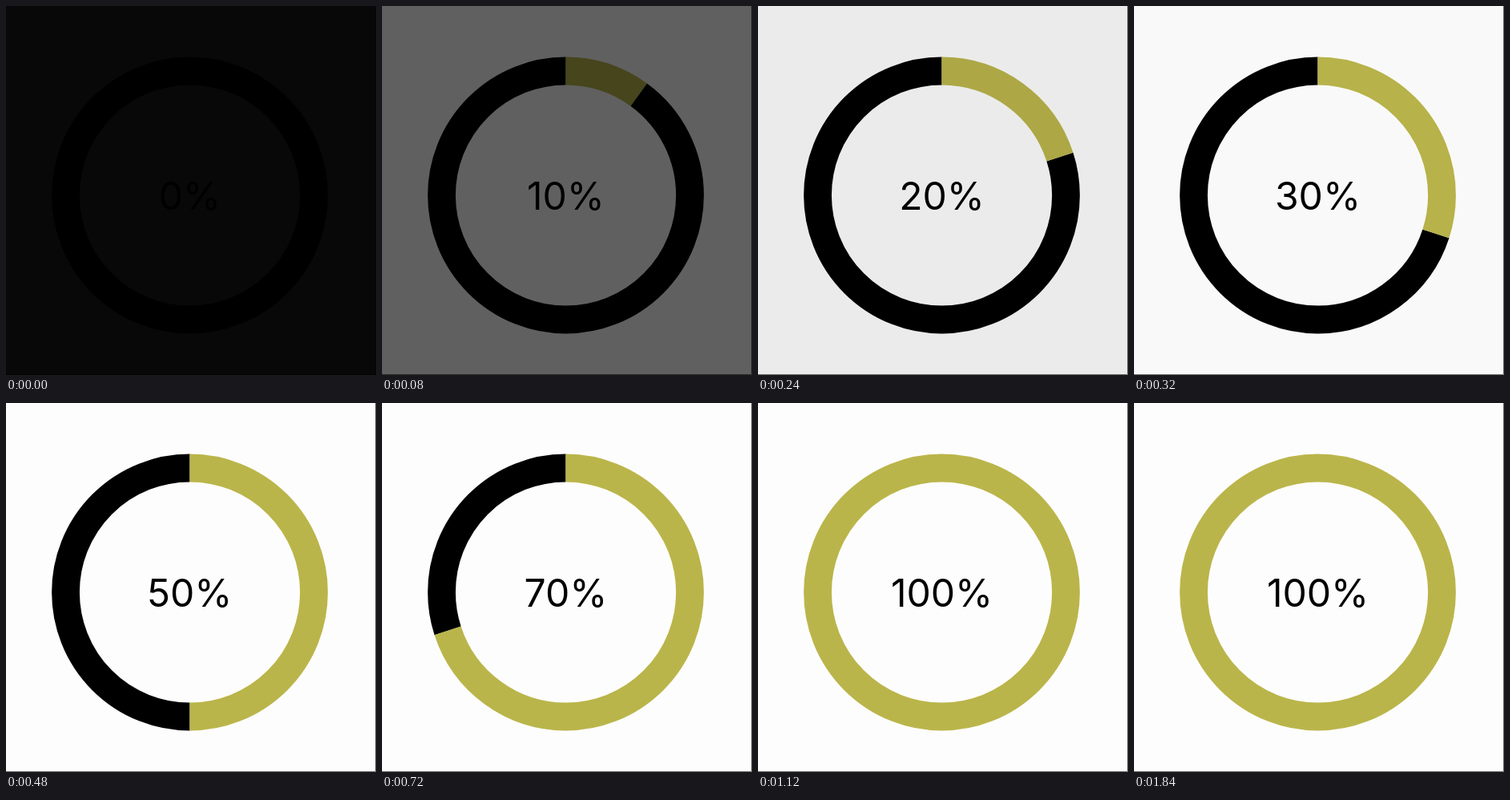
Recreate the animation shown at these times as an HTML page. Size 462 px wide and 460 px high, loop 3520 ms.

```html
<!DOCTYPE html>
<html lang="en">
<head>
<meta charset="utf-8">
<title>Progress ring</title>
<style>
  html, body { margin: 0; width: 100%; height: 100%; overflow: hidden; background: #000; }
  svg { display: block; width: 462px; height: 460px; background: #fdfdfd; }
  circle { fill: none; stroke-width: 34.8; }
  text { font: 48px Inter, Roboto, sans-serif; text-anchor: middle; }
</style>
</head>
<body>
<svg viewBox="0 0 462 460">
  <path d="M461.5 0V459.5H0" fill="none" stroke="#6a6a6a"/>
  <g transform="rotate(-90 229.5 236)">
    <circle id="track" cx="229.5" cy="236" r="155" pathLength="100" stroke="#000"/>
    <circle id="bar" cx="229.5" cy="236" r="155" pathLength="100" stroke="#bab54a"/>
  </g>
  <text id="label" x="229.5" y="254"></text>
  <rect id="shade" width="462" height="460"/>
</svg>
<script>
const LOOP = 3520, TICK = 80;
const light = [0.03, 0.38, 0.727, 0.928, 0.985, 1]; // fade-in, one level per tick
const [track, bar, label, shade] =
  ["track", "bar", "label", "shade"].map(id => document.getElementById(id));
const start = performance.now();

function draw() {
  const tick = Math.floor((performance.now() - start) % LOOP / TICK);
  // The counter gains 10% every 100 ms
  const percent = Math.min(100, 10 * Math.floor((tick * TICK + 50) / 100));
  track.setAttribute("stroke-dasharray", `0 ${percent} 100`);
  track.style.display = percent < 100 ? "" : "none";
  bar.setAttribute("stroke-dasharray", `${percent} 100`);
  bar.style.display = percent ? "" : "none";
  label.textContent = percent + "%";
  shade.style.opacity = 1 - (light[tick] ?? 1);
  requestAnimationFrame(draw);
}
draw();
</script>
</body>
</html>
```
